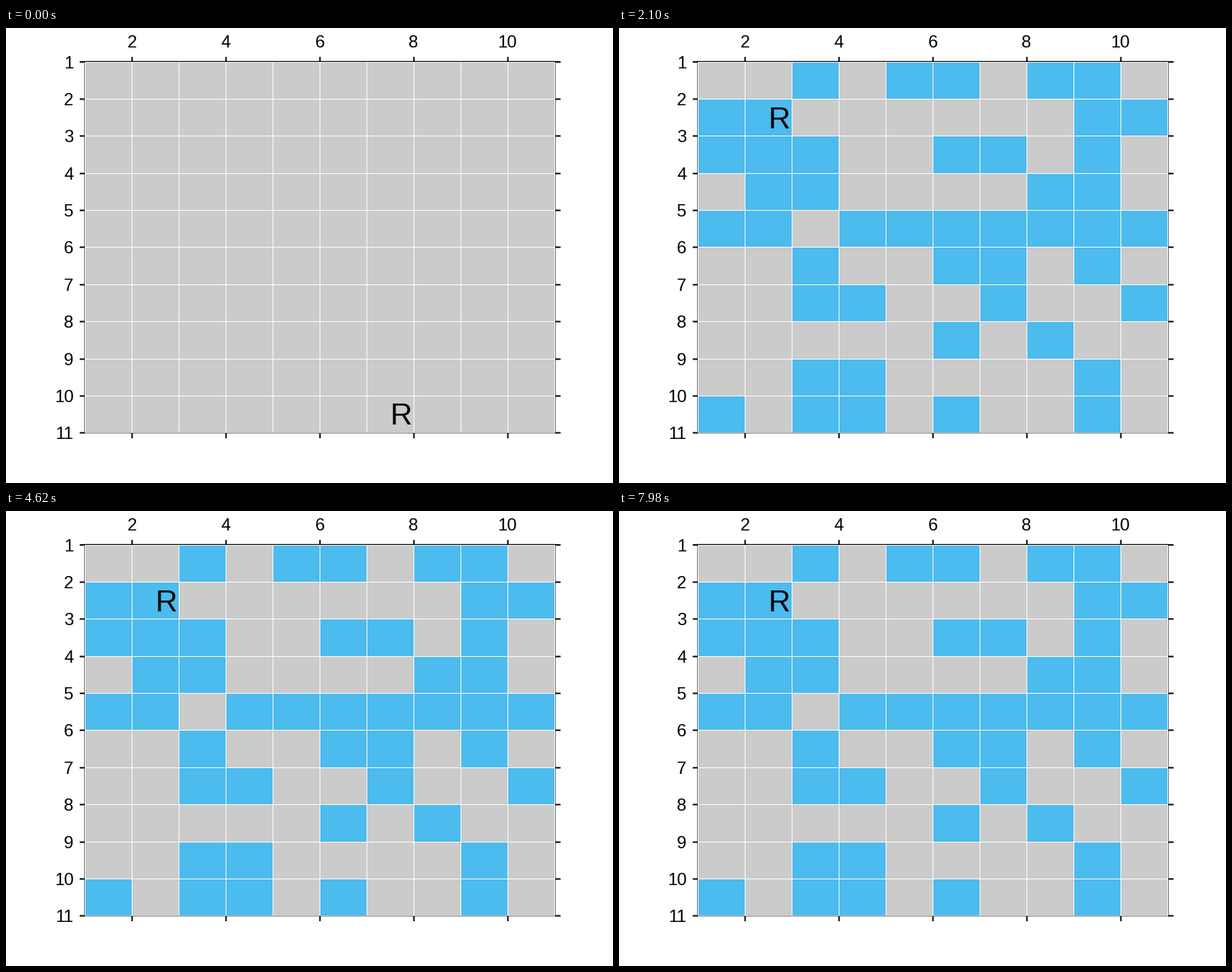
These frames come from a looping animation (840x630 px, 8 s). A matplotlib script:

```python
import matplotlib.pyplot as plt
from matplotlib.animation import FuncAnimation
from matplotlib.collections import PolyCollection
from matplotlib.patches import Rectangle

W, H, DPI = 840, 630, 100
LOOP, TICK, STEP = 8000, 20, 70          # milliseconds
GREY, BLUE, FRAME = "#cbcbcb", "#4cbbed", "#6a6a6a"
PT = 72 / DPI                            # points per pixel

# Columns of the blue cells, one entry per grid row
BLUE_COLS = [
    (3, 5, 6, 8, 9),
    (1, 2, 9, 10),
    (1, 2, 3, 6, 7, 9),
    (2, 3, 8, 9),
    (1, 2, 4, 5, 6, 7, 8, 9, 10),
    (3, 6, 7, 9),
    (3, 4, 7, 10),
    (6, 8),
    (3, 4, 9),
    (1, 3, 4, 6, 9),
]


def gx(col):
    return 109.0 + 65.05 * (col - 1)


def gy(row):
    return 47.25 + 51.345 * (row - 1)


fig = plt.figure(figsize=(W / DPI, H / DPI), dpi=DPI, facecolor="white")
ax = fig.add_axes([0, 0, 1, 1])
ax.set_xlim(0, W)
ax.set_ylim(H, 0)
ax.axis("off")


def box(x, y, w, h, color, z):
    ax.add_patch(Rectangle((x, y), w, h, fc=color, lw=0, zorder=z, snap=False))


def label(x, y, text, size, ha, z=5):
    return ax.text(x, y, text, fontsize=size * PT, family="Liberation Sans",
                   color="black", ha=ha, va="baseline", zorder=z)


def cell(col, row):
    x0, x1 = int(gx(col)), int(gx(col + 1))
    y0, y1 = int(gy(row)), int(gy(row + 1))
    return [(x0, y0), (x1, y0), (x1, y1), (x0, y1)]


# Board and white grid
box(109, 47, 651, 514, GREY, 1)
for i in range(1, 12):
    box(int(gx(i)), 47, 1, 514, "white", 3)
    box(109, int(gy(i)), 651, 1, "white", 3)

# Axis frame
box(108, 46, 1, 515, FRAME, 4)
box(760, 46, 1, 515, FRAME, 4)
box(108, 560.5, 653, 1, FRAME, 4)
box(108, 45.75, 653, 1.25, "black", 4)

# Ticks and labels
for col in range(2, 11, 2):
    x = int(gx(col)) + 0.5
    box(x - 1, 40, 2, 7, "black", 4)
    box(x - 1, 561, 2, 7, "black", 4)
    label(x - 0.5, 27, str(col), 24, "center")
for row in range(1, 12):
    y = int(gy(row)) + (0 if row == 1 else 0.5)
    box(102, y - 1, 7, 2, "black", 4)
    box(760, y - 1, 7.5, 2, "black", 4)
    label(93.5, y + 8.8, str(row), 24, "right")

blue = PolyCollection(
    [cell(c, r) for r, cols in enumerate(BLUE_COLS, 1) for c in cols],
    facecolors=BLUE, linewidths=0, zorder=2)
ax.add_collection(blue)
robot = label(0, 0, "R", 42, "left", 6)


def place(col, row):
    robot.set_position((gx(col + 0.5), gy(row) + 40))


def draw(n):
    # Half a tick of lead keeps every step in view at its exact time
    step = (n * TICK + TICK // 2) // STEP
    blue.set_visible(step > 0)
    if step == 0:
        place(7, 10)
    else:
        place(2, 2 + step % 2)
    return blue, robot


def start():
    return draw(0)


anim = FuncAnimation(fig, draw, frames=LOOP // TICK, interval=TICK,
                     init_func=start, repeat=True, repeat_delay=0, blit=False)
plt.show()
```
